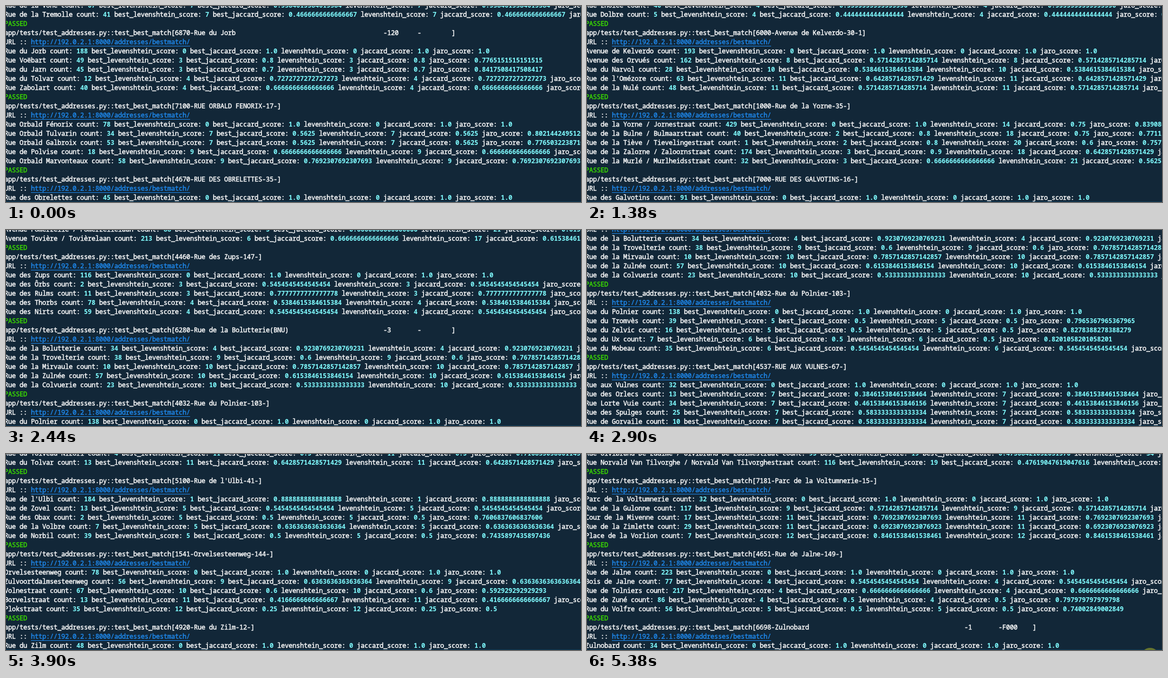
An HTML page with a canvas for the animation above (5.45 s loop, 1062 by 364 pixels).

```html
<!DOCTYPE html>
<html lang="en">
<head>
<meta charset="utf-8">
<title>Test run</title>
<style>
  html, body { margin: 0; width: 100%; height: 100%; overflow: hidden; background: #122738; }
  canvas { display: block; }
</style>
</head>
<body>
<canvas id="stage" width="1062" height="364"></canvas>
<script>
const LOOP = 5450, W = 1062, H = 364;
const CELL = 7, ROW = 17, LEFT = -3, BASE = 3;
const WHITE = '#ffffff', CYAN = '#80fcff', GREEN = '#3ad900', BLUE = '#1e88ec';
const FONT = '12px "Noto Sans Mono", "DejaVu Sans Mono", monospace';
const LINK = 'http://192.0.2.1:8000/addresses/bestmatch/';

// Times at which the log moves by a whole test or by half of one.
const FULL = [70, 320, 520, 720, 920, 1180, 1380, 1650, 1850, 2050, 2640, 3240,
  4100, 4300, 4510, 4840, 5040, 5240, 5380];
const HALF = [2380, 2440, 2900, 2980, 3440, 3570, 3770, 3900];

// Heading, then: street, count, distance, similarity [, distance, similarity] [, jaro].
// "*n" stands for n made-up results, "~" for padded fields.
const LOG = String.raw`
5020-Rue de la Zolme-4-
*3
Rue de la Vone,67,7,7/13
Rue de la Tremolle,41,7,7/15

6870-Rue du Jorb~120~
Rue du Jorb,188,0,1
Rue Voëbart,49,3,4/5,0.7765151515151515
Rue du Jarn,45,3,7/10,0.8417508417508417
Rue du Tolvar,12,4,8/11
Rue Zabolart,40,4,2/3

7100-RUE ORBALD FENORIX-17-
Rue Orbald Fénorix,78,0,1
Rue Orbald Tulvarin,34,7,9/16,0.8021442495126705
Rue Orbald Galbroix,53,7,9/16,0.7765032238710133
Rue de Polvise,18,9,2/3
Rue Orbald Marvonteaux,58,9,10/13

4670-RUE DES OBRELETTES-35-
Rue des Obrelettes,45,0,1
*4

5310-Rue du Zulnim-8-
Rue du Zulnim,64,0,1
*4

4190-Rue de Vorgax-72-
Rue de Vorgax,21,0,1
*4

6230-Rue des Nulbis-19-
Rue des Nulbis,107,0,1
*4

4820-RUE ZOLVRE-26-
Rue Zolvre,38,0,1
*2
Rue Zholée,40,4,5/9
Rue Dolbre,5,4,4/9

6000-Avenue de Kelverdo-30-1
Avenue de Kelverdo,193,0,1
Avenue des Orvués,162,8,4/7
Rue du Narvol,28,10,7/13
Rue de l'Omézore,63,11,9/14
Rue de la Nulé,48,11,4/7

1000-Rue de la Yorne-35-
Rue de la Yorne / Jornestraat,429,0,1,14,3/4,0.8390804597701149
Rue de la Bulne / Bulmaarstraat,40,2,4/5,18,3/4,0.7711111111111111
Rue de la Tiève / Tievelingestraat,1,2,4/5,20,3/5,0.7575757575757576
Rue de la Zalorne / Zaloornstraat,174,3,9/10,18,9/14
Rue de la Murlé / Murlheidsstraat,32,3,2/3,21,9/16

7000-RUE DES GALVOTINS-16-
Rue des Galvotins,91,0,1
*2
Rue des Polvores,7,5,7/10,0.8590686274509803
Rue des Norliers,95,5,6/11

1180-Avenue Bol\xe9rise-21-
Avenue Bolérise / Bollaan,189,0,1,10,9/13
Avenue Orvanel / Orvanellaan,30,5,8/11,15,2/3
Avenue Wolderney / Wolderneylaan,194,5,7/11,20,2/3
Avenue Pomerzelle / Pomerzellelaan,88,5,2/3,21,8/13
Avenue Tovière / Tovièrelaan,213,6,2/3,17,8/13

4460-Rue des Zups-147-
Rue des Zups,116,0,1
Rue des Ôrbs,2,3,6/11
Rue des Rulms,11,3,7/9
Rue des Thorbs,78,4,7/13
Rue des Nirts,59,4,6/11

6280-Rue de la Bolutterie(BNU)~3~
Rue de la Bolutterie,34,4,12/13
Rue de la Trovelterie,38,9,3/5,0.7678571428571428
Rue de la Mirvaule,10,10,11/14
Rue de la Zulnée,57,10,8/13
Rue de la Colvuerie,23,10,8/15

4032-Rue du Polnier-103-
Rue du Polnier,138,0,1
Rue du Tromvès,39,5,1/2,0.7965367965367965
Rue du Zelvic,16,5,1/2,0.8278388278388279
Rue du Ux,7,6,1/2,0.8201058201058201
Rue du Mobeau,35,6,6/11

4537-RUE AUX VULNES-67-
Rue aux Vulnes,32,0,1
Rue des Orlecs,13,7,5/13
Rue Lorte Vuie,34,7,6/13
Rue des Spulges,25,7,7/12
Rue de Gorvaile,10,7,7/12

5500-Rue du Nolvart Gimard-9-
Rue du Nolvart Gimard,16,0,1
*2
Rue du Tolveau Nizorl,4,11,1/2,0.7168350586611459
Rue du Tolvar,13,11,9/14

5100-Rue de l'Ulbi-41-
Rue de l'Ulbi,184,1,8/9
Rue de Zovel,13,5,6/11
Rue des Obax,2,5,1/2,0.7606837606837606
Rue de la Volbre,7,5,7/11
Rue de Norbil,39,5,1/2,0.7435897435897436

1541-Orvelsesteenweg-144-
Orvelsesteenweg,78,0,1
Zulvoortdalmsesteenweg,56,9,7/11
Volnestraat,67,10,3/5,0.592929292929293
Borvelstraat,13,11,5/12
Plokstraat,35,12,1/4,0.5

4920-Rue du Zilm-12-
Rue du Zilm,48,0,1
*2
Rue du Gorm,17,4,5/11
Rue du Crulx,32,4,3/5,0.797979797979798

1357-Rue de la Vurpe-1-BTE5
Rue de la Vurpe,7,0,1
Rue de la Pulhe,2,3,7/13
Rue de l'Ozirue,66,5,2/3
Rue de la Tulbière,43,6,8/13
Rue de l'Ombise,1,6,7/13

1040-Avenue Zorvelle 189 /b002--
Avenue Zorvelle / Zoorvelaan,1004,10,4/7,12,8/17
Avenue Urbin Gavot / Urbin Gavotlaan,179,14,8/17,24,2/5
Avenue Olvène Nibaux / Olvène Nibauxlaan,8,14,7/17,27,1/3
Avenue Zomille Vubet / Zomille Vubetlaan,36,14,2/5,28,8/21
Avenue du Urze Golvabre / Ulf Golvaberlaan,359,14,8/17,28,2/5

7060-Rue Mademoiselle Vorniq-51-
Rue Mademoiselle Vorniq,85,0,1
*4

1030-Rue Ulvorin De Zaalbe-63-
Rue Ulvorin De Zaalbe / Ulvorin De Zaalbestraat,72,0,1,26,1/2
*2
Rue Ulvibrand De Zuulme / Ulvibrand De Zuulmestraat,95,19,9/19,34,2/5
Rue Norvald Van Tilvorghe / Norvald Van Tilvorghestraat,116,19,10/21,36,2/5

7181-Parc de la Voltumnerie-15-
Parc de la Voltumnerie,32,0,1
Rue de la Gulonne,117,9,4/7
Cour de la Mivenne,17,11,10/13
Rue de la Zimlette,29,11,9/13
Place de la Vorlion,7,12,11/13

4651-Rue de Jalne-149-
Rue de Jalne,223,0,1
Bois de Jalne,77,4,6/11
Rue de Tolniers,217,4,2/3
Rue de Zuné,86,4,1/2,0.797979797979798
Rue du Volfre,56,5,1/2,0.74002849002849

6698-Zulnobard~1~F000
Zulnobard,34,0,1
*4
`;

let seed = 7;
const rand = n => (seed = seed * 16807 % 2147483647) % n;
const pick = list => list[rand(list.length)];

function madeUp() {
  const part = () => pick(['vor', 'zul', 'nim', 'bax', 'gol', 'tuv']);
  const word = part() + part();
  const street = `Rue ${pick(['de la', 'du', 'des', 'de'])} ${word[0].toUpperCase()}${word.slice(1)}`;
  return `${street},${1 + rand(90)},${4 + rand(6)},${6 + rand(4)}/${11 + rand(3)}`;
}

const decimal = x => Number.isInteger(x) ? x + '.0' : String(x);

function ratio(text) {
  const [a, b = 1] = text.split('/');
  return a / b;
}

function heading(text) {
  const [street, house, box] = text.split('~');
  const id = house === undefined ? street
    : `${street.padEnd(55)}-${house.padEnd(8)}-${box.padEnd(8)}`;
  return [[`app/tests/test_addresses.py::test_best_match[${id}]`, WHITE]];
}

function result(text) {
  const [street, count, dist, sim, ...rest] = text.split(',');
  const [dist2, sim2] = rest.length > 1 ? rest.splice(0, 2) : [dist, sim];
  const jaro = rest.length ? +rest[0] : (2 + ratio(sim2)) / 3;
  const fields = [
    [`${street} count: `, count],
    [' best_levenshtein_score: ', dist],
    [' best_jaccard_score: ', decimal(ratio(sim))],
    [' levenshtein_score: ', dist2],
    [' jaccard_score: ', decimal(ratio(sim2))],
    [' jaro_score: ', decimal(jaro)]
  ];
  return fields.flatMap(([label, value]) => [[label, WHITE], [value, CYAN]]);
}

function block(text) {
  const [head, ...body] = text.split('\n');
  const rows = body.flatMap(s => s[0] === '*' ? Array.from({ length: +s[1] }, madeUp) : [s]);
  return [
    heading(head),
    [['URL :: ', WHITE], [LINK, BLUE]],
    ...rows.map(result),
    [['PASSED', GREEN]]
  ];
}

const lines = LOG.trim().split('\n\n').flatMap(block);
const ctx = document.getElementById('stage').getContext('2d', { alpha: false });
ctx.lineWidth = 0.45;
ctx.lineJoin = 'round';

// Each character sits in its own terminal cell; plain text gets a hairline for weight.
function drawLine(runs, y) {
  let x = LEFT;
  for (const [text, color] of runs) {
    const bold = color === CYAN;
    ctx.font = (bold ? 'bold ' : '') + FONT;
    ctx.fillStyle = ctx.strokeStyle = color;
    if (color === BLUE) ctx.fillRect(x, y + 3, text.length * CELL, 1);
    for (const ch of text) {
      if (ch !== ' ' && x < W) {
        ctx.fillText(ch, x, y);
        if (!bold) ctx.strokeText(ch, x, y);
      }
      x += CELL;
    }
  }
}

function draw(full, half) {
  const top = 5 + 8 * full + 4 * half;
  ctx.fillStyle = '#122738';
  ctx.fillRect(0, 0, W, H);
  for (let r = 0; r < 22; r++) {
    if (lines[top + r]) drawLine(lines[top + r], BASE + r * ROW);
  }
  ctx.fillStyle = '#0d3a58';
  ctx.fillRect(0, H - 1, W, 1);
  // Pointer halo peeking in at the bottom edge.
  if (full === FULL.length) {
    ctx.fillStyle = '#66752f';
    ctx.beginPath();
    ctx.arc(1040, 377, 17, 0, 2 * Math.PI);
    ctx.fill();
  }
}

const start = performance.now();
let shown = -1;
function tick() {
  const t = (performance.now() - start) % LOOP;
  const [full, half] = [FULL, HALF].map(times => times.filter(s => s <= t).length);
  if (full + half !== shown) {
    shown = full + half;
    draw(full, half);
  }
  requestAnimationFrame(tick);
}
tick();
</script>
</body>
</html>
```
